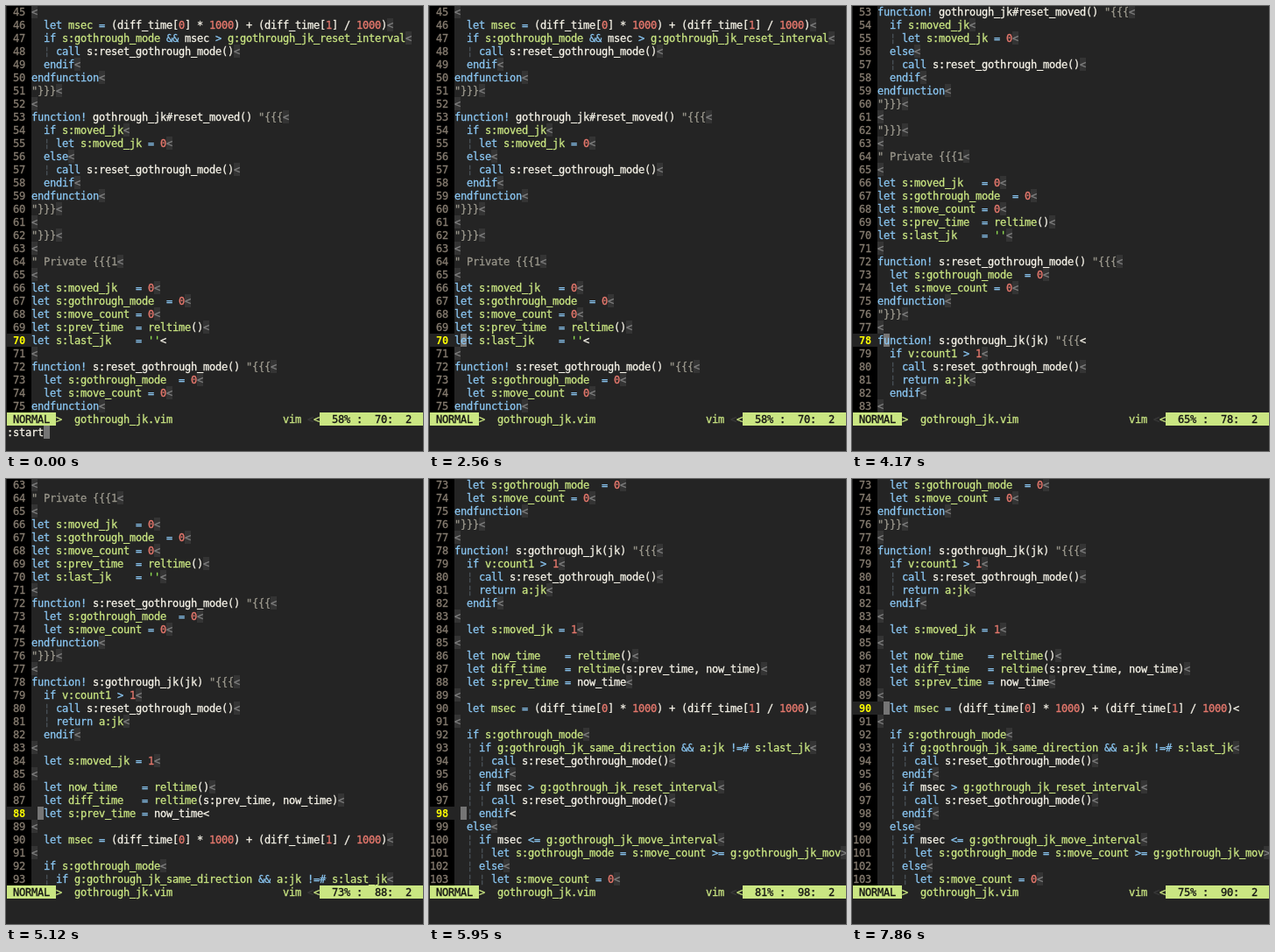
An HTML page with a canvas for the animation above (8 s loop, 476 by 508 pixels).

```html
<!DOCTYPE html>
<html>
<head>
<meta charset="utf-8">
<style>
html, body { margin: 0; width: 476px; height: 508px; overflow: hidden; background: #242424; }
canvas { display: block; }
</style>
</head>
<body>
<canvas id="screen" width="476" height="508"></canvas>
<script>
const FIRST = 45, TOTAL = 120, ROWS = 31, COLS = 68, LOOP = 8000;
const CW = 7, CH = 15;
const WHITE = '#f6f3e8', LIME = '#cae682', BLUE = '#8ac6f2', RED = '#e5786d',
      GREEN = '#95e454', GREY = '#99968b', DARK = '#242424', CURSOR = '#757575';

const lines = `
  let msec = (diff_time[0] * 1000) + (diff_time[1] / 1000)
  if s:gothrough_mode && msec > g:gothrough_jk_reset_interval
    call s:reset_gothrough_mode()
  endif
endfunction
"}}}

function! gothrough_jk#reset_moved() "{{{
  if s:moved_jk
    let s:moved_jk = 0
  else
    call s:reset_gothrough_mode()
  endif
endfunction
"}}}

"}}}

" Private {{{1

let s:moved_jk   = 0
let s:gothrough_mode  = 0
let s:move_count = 0
let s:prev_time  = reltime()
let s:last_jk    = ''

function! s:reset_gothrough_mode() "{{{
  let s:gothrough_mode  = 0
  let s:move_count = 0
endfunction
"}}}

function! s:gothrough_jk(jk) "{{{
  if v:count1 > 1
    call s:reset_gothrough_mode()
    return a:jk
  endif

  let s:moved_jk = 1

  let now_time    = reltime()
  let diff_time   = reltime(s:prev_time, now_time)
  let s:prev_time = now_time

  let msec = (diff_time[0] * 1000) + (diff_time[1] / 1000)

  if s:gothrough_mode
    if g:gothrough_jk_same_direction && a:jk !=# s:last_jk
      call s:reset_gothrough_mode()
    endif
    if msec > g:gothrough_jk_reset_interval
      call s:reset_gothrough_mode()
    endif
  else
    if msec <= g:gothrough_jk_move_interval
      let s:gothrough_mode = s:move_count >= g:gothrough_jk_move_count
    else
      let s:move_count = 0`.split('\n');

// First matching rule wins
const rules = [
  [/".*$/y, GREY],
  [/''/y, GREEN],
  [/(function!|(endfunction|endif|else|if|let|call|return)\b)/y, BLUE],
  [/reltime/y, LIME],
  [/[\w:#]+(?=\()/y, WHITE],
  [/(?<=\()\w:\w+/y, WHITE],
  [/[svga]:\w+/y, LIME],
  [/(?<=let )\w+/y, LIME],
  [/\d+/y, RED],
  [/\w+/y, WHITE],
  [/[=<>!&#]+/y, BLUE],
  [/./y, WHITE],
];

// [time, cursor line, top line]
const moves = [
  [0, 70, 45], [2980, 71, 46], [3400, 72, 47], [3760, 73, 48], [4170, 78, 53],
  [4650, 83, 58], [5120, 88, 63], [5540, 93, 68], [5950, 98, 73],
  [6550, 97, 73], [7030, 96, 73], [7500, 95, 73], [7860, 90, 73],
];
// [time, command line, cursor visible]
const commands = [
  [0, ':start', 1], [420, ':start', 0], [650, ':star', 1], [770, ':sta', 1],
  [950, ':st', 1], [1130, ':s', 1], [1370, ':', 1],
  [1610, '', 1], [2320, '', 0], [2560, '', 1],
];

const ctx = document.getElementById('screen').getContext('2d');
const at = (steps, t) => steps.filter(s => s[0] <= t).pop();

function block(col, row, n, color) {
  ctx.fillStyle = color;
  ctx.fillRect(1 + col * CW, row * CH - 1, n * CW, CH);
}

// A thin outline gives the text its weight
function put(text, col, row, color, bold) {
  ctx.font = (bold ? 'bold ' : '') + '12px "DejaVu Sans Mono", monospace';
  ctx.fillStyle = ctx.strokeStyle = color;
  ctx.lineWidth = 0.3;
  [...text].forEach((c, i) => {
    if (c === ' ') return;
    const x = 1 + (col + i) * CW, y = row * CH + 11;
    ctx.fillText(c, x, y);
    if (!bold) ctx.strokeText(c, x, y);
  });
}

function codeLine(num, row, current, cursorCol) {
  const text = lines[num - FIRST], room = COLS - 5;
  if (!current) block(0, row, 4, '#000');
  put(String(num).padStart(3), 0, row, current ? '#ffff00' : '#857b6f', current);

  const end = 4 + Math.min(text.length, room);
  if (!current) block(end, row, 1, '#343434');
  if (cursorCol) block(cursorCol, row, 1, CURSOR);

  const indent = text.search(/\S|$/);
  for (let i = 2; i < indent; i += 2) put('¦', 4 + i, row, '#4c545a');
  for (let i = indent; i < Math.min(text.length, room);) {
    const [re, color] = rules.find(([re]) => (re.lastIndex = i, re.test(text)));
    put(text.slice(i, Math.min(re.lastIndex, room)), 4 + i, row, color);
    i = re.lastIndex;
  }
  put(text.length > room ? '>' : '<', end, row, current ? WHITE : '#808080');
}

function statusLine(line, column) {
  const row = ROWS;
  block(0, row, 8, LIME);
  block(51, row, 17, LIME);
  put('NORMAL', 1, row, '#141413');
  put('>', 8, row, LIME);
  put('gothrough_jk.vim', 11, row, LIME);
  put('vim', 45, row, LIME);
  put('<', 49, row, '#3a3a3a');
  put('<', 50, row, LIME);
  const percent = Math.floor(line * 100 / TOTAL);
  put(`${percent}% :  ${line}:  ${column}`, 53, row, '#141413');
}

function draw(t) {
  const [, line, top] = at(moves, t);
  const [, command, visible] = at(commands, t);
  const column = lines[line - FIRST] ? 2 : 1;
  ctx.fillStyle = DARK;
  ctx.fillRect(0, 0, 476, 508);
  for (let row = 0; row < ROWS; row++) {
    const current = top + row === line;
    codeLine(top + row, row, current, current && visible && !command ? 3 + column : 0);
  }
  statusLine(line, column);
  put(command, 0, ROWS + 1, WHITE);
  if (command && visible) block(command.length, ROWS + 1, 1, CURSOR);
}

function frame() {
  draw(performance.now() % LOOP);
  requestAnimationFrame(frame);
}
frame();
</script>
</body>
</html>
```
